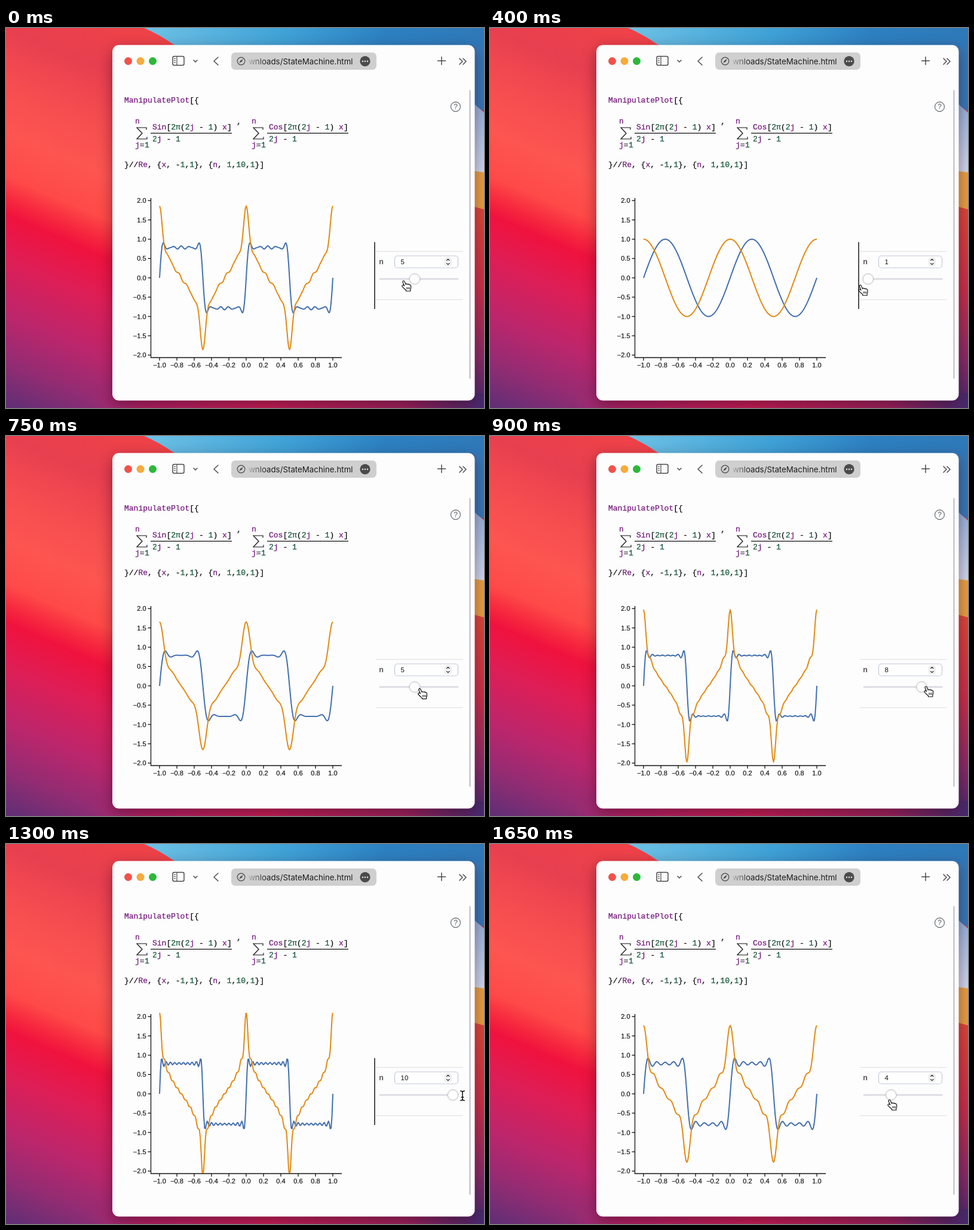
An HTML page that plays this animation: 800 by 637 pixels, repeating every 1700 ms.

```html
<!DOCTYPE html>
<html lang="en">
<head>
<meta charset="utf-8">
<title>ManipulatePlot</title>
<style>
  html, body { margin: 0; width: 100%; height: 100%; overflow: hidden; background: #d8304f; }
  svg { display: block; width: 800px; height: 637px; }
  text { font-family: "Liberation Sans", Arial, sans-serif; fill: #111; white-space: pre; }
  .code { font: 13px "Liberation Mono", "Courier New", monospace; stroke-width: .25; }
  .label { font-size: 11px; stroke: #111; stroke-width: .2; }
  .line { fill: none; stroke: #4a4a4c; stroke-width: 1.5; stroke-linecap: round; stroke-linejoin: round; }
  .axis { fill: none; stroke: #111; stroke-width: 1.3; }
  .curve { fill: none; stroke-width: 2; stroke-linejoin: round; }
  .win { filter: drop-shadow(0 8px 12px rgba(40, 0, 20, .45)); }
  .knob { filter: drop-shadow(0 .5px .8px rgba(0, 0, 0, .25)); }
</style>
</head>
<body>
<svg viewBox="0 0 800 637">
  <defs>
    <linearGradient id="warm" gradientUnits="userSpaceOnUse" x1="32" y1="-74" x2="-234" y2="539">
      <stop offset="0" stop-color="#ee4248"/>
      <stop offset=".12" stop-color="#e83f50"/>
      <stop offset=".24" stop-color="#f54c50"/>
      <stop offset=".36" stop-color="#fd5550"/>
      <stop offset=".46" stop-color="#fe4a48"/>
      <stop offset=".515" stop-color="#f6263e"/>
      <stop offset=".55" stop-color="#f0123e"/>
      <stop offset=".65" stop-color="#de1e56"/>
      <stop offset=".78" stop-color="#bc266c"/>
      <stop offset=".89" stop-color="#922c73"/>
      <stop offset="1" stop-color="#5c2f75"/>
    </linearGradient>
    <linearGradient id="sky" gradientUnits="userSpaceOnUse" x1="240" y1="0" x2="800" y2="60">
      <stop offset="0" stop-color="#6cc0e4"/>
      <stop offset=".4" stop-color="#3fa2d6"/>
      <stop offset=".7" stop-color="#2c80c1"/>
      <stop offset="1" stop-color="#2f78b8"/>
    </linearGradient>
    <linearGradient id="side" gradientUnits="userSpaceOnUse" x1="0" y1="300" x2="0" y2="637">
      <stop offset="0" stop-color="#de4638"/>
      <stop offset=".4" stop-color="#cc2f48"/>
      <stop offset=".75" stop-color="#8a2b68"/>
      <stop offset="1" stop-color="#452a70"/>
    </linearGradient>
    <linearGradient id="pale" gradientUnits="userSpaceOnUse" x1="0" y1="130" x2="0" y2="242">
      <stop offset="0" stop-color="#93b2dc"/>
      <stop offset="1" stop-color="#d3daee"/>
    </linearGradient>
    <linearGradient id="floor" gradientUnits="userSpaceOnUse" x1="140" y1="0" x2="800" y2="0">
      <stop offset="0" stop-color="#a82a70" stop-opacity="0"/>
      <stop offset=".12" stop-color="#b42368"/>
      <stop offset=".45" stop-color="#cc2058"/>
      <stop offset=".8" stop-color="#a0245f"/>
      <stop offset="1" stop-color="#452a70"/>
    </linearGradient>
    <linearGradient id="fade" gradientUnits="userSpaceOnUse" x1="406" y1="0" x2="434" y2="0">
      <stop offset="0" stop-color="#b4b4b4"/>
      <stop offset="1" stop-color="#1c1c1e"/>
    </linearGradient>
    <clipPath id="plot"><path d="M243 283H562V552H243z"/></clipPath>
  </defs>

  <path fill="url(#warm)" d="M0 0H800V637H0z"/>
  <path fill="url(#sky)" d="M231 0C254 10 274 22 300 42H800V0z"/>
  <path fill="#3578b8" d="M770 30H800V140L770 120z"/>
  <path fill="url(#pale)" d="M770 115L800 142V250H770z"/>
  <path fill="#e9a044" d="M770 238L800 242V310H770z"/>
  <path fill="url(#side)" d="M770 296L800 304V637H770z"/>
  <path fill="url(#floor)" d="M140 612H800V637H140z"/>

  <rect class="win" x="178" y="28.5" width="606.5" height="596" rx="11" fill="#fdfdfd"/>

  <g id="chrome">
    <circle cx="204.5" cy="55.5" r="6.5" fill="#f0524a"/>
    <circle cx="225" cy="55.5" r="6.5" fill="#f6ab3c"/>
    <circle cx="245.5" cy="55.5" r="6.5" fill="#2cb83a"/>
    <g class="line">
      <rect x="279" y="47.5" width="19" height="15" rx="2.5"/>
      <path d="M286 48v14M281.5 51.5h2M281.5 54.5h2M281.5 57.5h2" stroke-width="1.2"/>
      <path d="M314 54l3 3 3-3M355 49l-7 6.5 7 6.5M722.5 55h13M729 48.5v13M759 51l5 5-5 5M765 51l5 5-5 5"/>
    </g>
    <rect x="377" y="41" width="243" height="29" rx="6.5" fill="#cfcfd0"/>
    <circle class="line" cx="393.5" cy="55.5" r="6.3" style="stroke-width:1.2"/>
    <path d="M396.8 52.2l-2.2 4.4-4.4 2.2 2.2-4.4z" fill="#4a4a4c"/>
    <text x="580.5" y="61" text-anchor="end" fill="url(#fade)" style="font:13.3px Inter,sans-serif;fill:url(#fade)">wnloads/StateMachine.html</text>
    <circle cx="601" cy="55.7" r="8.6" fill="#4b4b4d"/>
    <path d="M597 55.7h.01M601 55.7h.01M605 55.7h.01" stroke="#eee" stroke-width="2.4" stroke-linecap="round"/>
    <path d="M776.5 105V587" stroke="#b9bac4" stroke-width="2" stroke-linecap="round"/>
    <circle class="line" cx="752.5" cy="132" r="8" style="stroke:#6e7278;stroke-width:1.3"/>
    <text x="752.5" y="136.3" text-anchor="middle" style="font-size:12px;fill:#5a5e64">?</text>
  </g>

  <g id="code"></g>
  <g id="axes"><path class="axis" d="M242.5 285V552.5H562"/></g>
  <g clip-path="url(#plot)">
    <path id="sine" class="curve" stroke="#436fae"/>
    <path id="cosine" class="curve" stroke="#e08a14"/>
  </g>

  <path d="M619 374.5H765M619 455.5H765" stroke="#dedee0"/>
  <path id="bar" d="M617 359V471" stroke="#3a3a3c" stroke-width="1.8"/>
  <text x="624.5" y="395.5" style="font-size:13px">n</text>
  <rect x="650.5" y="382" width="106" height="20" rx="4.5" fill="#fff" stroke="#c2c8d8" stroke-width="1.2"/>
  <text id="count" x="660.5" y="396.3" style="font-size:11.5px"></text>
  <rect x="734.5" y="385" width="10.5" height="14" rx="3.5" fill="#f4f4f5" stroke="#dcdcde" stroke-width=".8"/>
  <path class="line" d="M737.5 389.7l2.3-2.3 2.3 2.3M737.5 394.3l2.3 2.3 2.3-2.3" style="stroke:#222;stroke-width:1.2"/>
  <path d="M626 420.7H756" stroke="#dcdee4" stroke-width="3" stroke-linecap="round"/>
  <circle id="knob" class="knob" cy="420.7" r="8.5" fill="#fff" stroke="#c9c9cc" stroke-width=".9"/>

  <g id="hand" stroke="#111" stroke-width="1.2" stroke-linejoin="round">
    <path fill="#fff" d="M-6-6.3C-6.2-8.6-3.5-9-2.8-6.8L-.8-2C-.2-3.5 1.8-3.4 2.4-2 3-3.2 4.8-2.8 5-1.4 6-2.2 7.5-1.4 7.6.2 8 3 7.8 5 6.8 6.5V9H-.5V7.5C-3 5.5-5 3.5-6.8 1.4-8-.2-6-1.8-4.5-.6L-3.4.2z"/>
    <path fill="none" stroke-width="1" d="M.9 2.5v3.4M3.1 2.5v3.4M5.3 2.5v3.4"/>
  </g>
  <g id="beam" fill="none" stroke-linecap="round">
    <path stroke="#fff" stroke-width="3" d="M0-6V6"/>
    <path stroke="#111" stroke-width="1.5" d="M-3.3-8Q0-8 0-5.5 0-8 3.3-8M0-5.5V5.5M-3.3 8Q0 8 0 5.5 0 8 3.3 8M-1.8 2.5H1.8"/>
  </g>
</svg>
<script>
const LOOP = 1700, TICK = 50, BLEND = 100;
const $ = id => document.getElementById(id);
const add = (id, html) => $(id).insertAdjacentHTML('beforeend', html);

// Code listing: words purple, numbers green, punctuation black
const ink = s => /[A-Za-z]/.test(s) ? '#74177c' : /[\dπ]/.test(s) ? '#16583a' : '#111';
function code(x, y, s) {
  const spans = s.match(/[A-Za-z]+|[\dπ]+|[^A-Za-z\dπ]+/g)
    .map(p => `<tspan fill="${ink(p)}" stroke="${ink(p)}">${p}</tspan>`).join('');
  add('code', `<text class="code" x="${x}" y="${y}">${spans}</text>`);
}
function sum(x, fn) {
  code(x, 160, 'n');
  code(x, 200, 'j=');
  code(x + 16, 200, '1');
  code(x + 29, 170, fn + '[2π(2j - 1) x]');
  code(x + 29, 190, '2j - 1');
  add('code', `<path d="M${x + 19} 170.5v-3.5h-16l9 9.5-9 9.5h17v-3.5M${x + 26} 176.3h136" fill="none" stroke="#111" stroke-width="1.2"/>`);
}
code(198, 125, 'ManipulatePlot[{');
sum(216, 'Sin');
code(386, 161, ',');
sum(411, 'Cos');
code(198, 233, '}//Re, {x, -1,1}, {n, 1,10,1}]');

// Axes
const px = x => 402 + 145 * x;
const py = y => 418.8 - 64.75 * y;
const num = v => v.toFixed(1).replace('-', '−');
for (let i = -4; i <= 4; i++) {
  const y = py(i / 2);
  add('axes', `<path class="axis" d="M237.5 ${y}h5"/><text class="label" x="234.5" y="${y + 4}" text-anchor="end">${num(i / 2)}</text>`);
}
for (let i = -5; i <= 5; i++) {
  const x = px(i / 5);
  add('axes', `<path class="axis" d="M${x} 552.5v5"/><text class="label" x="${x}" y="569" text-anchor="middle">${num(i / 5)}</text>`);
}

// Slider value from each time on
const steps = [[-300, 7], [-57, 5], [40, 4], [70, 3], [100, 2], [240, 1], [540, 2], [592, 3],
  [680, 4], [730, 5], [775, 6], [820, 7], [852, 8], [910, 9], [960, 10],
  [1410, 9], [1460, 8], [1490, 7], [1520, 6], [1550, 5], [1635, 4]];
// Pointer path: time, x, y
const path = [[0, 670, 432], [200, 637, 438], [350, 622, 440], [480, 628, 438], [650, 672, 434],
  [900, 734, 428], [1150, 767, 418], [1300, 764, 422], [1450, 723, 430], [1650, 673, 437], [1700, 670, 437]];

const valueAt = t => steps.filter(s => s[0] <= t).pop()[1];

// Weight of term j: share of the recent past in which it was switched on
function weight(j, t) {
  return steps.reduce((w, [start, n], i) => {
    const end = i + 1 < steps.length ? steps[i + 1][0] : LOOP;
    const span = Math.min(t, end) - Math.max(t - BLEND, start);
    return n >= j ? w + Math.max(0, span) / BLEND : w;
  }, 0);
}

function pointerAt(t) {
  const i = path.findIndex(p => p[0] > t);
  const a = path[i - 1], b = path[i], k = (t - a[0]) / (b[0] - a[0]);
  return [a[1] + k * (b[1] - a[1]), a[2] + k * (b[2] - a[2])];
}

function curve(fn, weights) {
  let d = '';
  for (let i = -100; i <= 100; i++) {
    const x = i / 100;
    const y = weights.reduce((s, w, j) => s + w * fn(2 * Math.PI * (2 * j + 1) * x) / (2 * j + 1), 0);
    d += (d ? 'L' : 'M') + px(x).toFixed(2) + ' ' + py(y).toFixed(2);
  }
  return d;
}

function draw(t) {
  const n = valueAt(t), [x, y] = pointerAt(t), text = x > 757;
  const weights = Array.from({ length: 10 }, (_, j) => weight(j + 1, t));
  $('sine').setAttribute('d', curve(Math.sin, weights));
  $('cosine').setAttribute('d', curve(Math.cos, weights));
  $('count').textContent = n;
  $('knob').setAttribute('cx', 620 + 12.8 * n);
  $('bar').style.display = (t >= 450 && t < 1050) || t >= 1550 ? 'none' : '';
  for (const id of ['hand', 'beam']) {
    $(id).setAttribute('transform', `translate(${x} ${y})`);
    $(id).style.display = (id === 'beam') === text ? '' : 'none';
  }
}

const begin = performance.now();
let last = -1;
function frame() {
  const t = Math.floor((performance.now() - begin) % LOOP / TICK) * TICK;
  if (t !== last) draw(last = t);
  requestAnimationFrame(frame);
}
frame();
</script>
</body>
</html>
```
